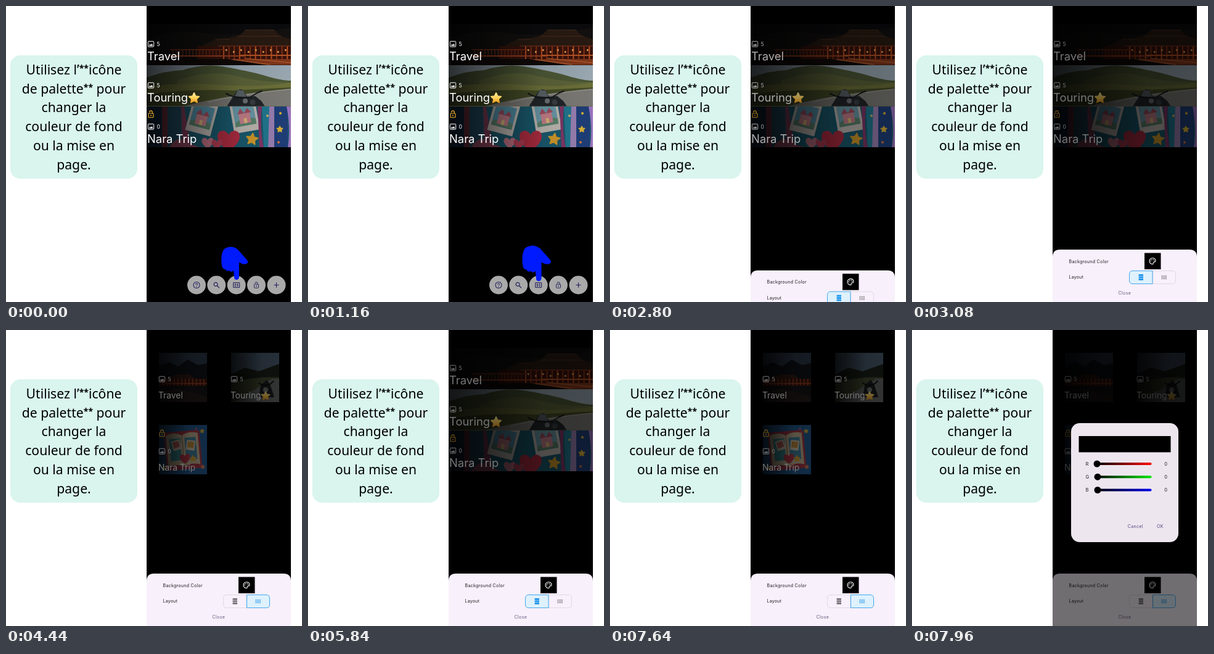
Recreate the animation shown at these times as an HTML page. Size 480 by 480 pixels, loop 8 s.

```html
<!DOCTYPE html>
<html lang="fr">
<head>
<meta charset="utf-8">
<title>Palette</title>
<style>
html, body { margin: 0; width: 100%; height: 100%; overflow: hidden; background: #fff; }
svg { display: block; }
text { font-family: Inter, Roboto, sans-serif; white-space: pre; }
.note { font-family: "Noto Sans", "Open Sans", sans-serif; font-size: 21.2px; text-anchor: middle; }
</style>
</head>
<body>
<svg id="stage" width="100%" height="100%" viewBox="0 0 480 480"></svg>
<script>
const LOOP = 8000;

const rect = (x, y, w, h, fill, more = '') =>
  `<rect x="${x}" y="${y}" width="${w}" height="${h}" fill="${fill}" ${more}/>`;
const path = (d, fill, more = '') => `<path d="${d}" fill="${fill}" ${more}/>`;
const line = (d, color, width = 1) =>
  path(d, 'none', `stroke="${color}" stroke-width="${width}" stroke-linecap="round" stroke-linejoin="round"`);
const circle = (x, y, r, fill, more = '') => `<circle cx="${x}" cy="${y}" r="${r}" fill="${fill}" ${more}/>`;
const text = (x, y, size, str, fill = '#fff', gap = 0) =>
  `<text x="${x}" y="${y}" font-size="${size}" fill="${fill}" letter-spacing="${gap}">${str}</text>`;
const at = (x, y, body, more = '') => `<g transform="translate(${x} ${y}) ${more}">${body}</g>`;
const repeat = (n, make) => Array.from({ length: n }, (_, i) => make(i)).join('');
const picture = (id, x, y, w, h, body) =>
  `<svg id="${id}" x="${x}" y="${y}" width="${w}" height="${h}" viewBox="0 0 ${w} ${h}">${body}</svg>`;
const ramp = (id, stops, dir = 'x2="1" y2="0"') =>
  `<linearGradient id="${id}" x1="0" y1="0" ${dir}>${stops.map(([o, c, a = 1]) =>
    `<stop offset="${o}" stop-color="${c}" stop-opacity="${a}"/>`).join('')}</linearGradient>`;

function star(x, y, r, fill, turn = 0) {
  const points = Array.from({ length: 10 }, (_, i) => {
    const a = (i * 36 - 90 + turn) * Math.PI / 180, d = i % 2 ? r * 0.5 : r;
    return (x + d * Math.cos(a)).toFixed(1) + ',' + (y + d * Math.sin(a)).toFixed(1);
  });
  return `<polygon points="${points.join(' ')}" fill="${fill}" stroke="${fill}" stroke-width="1.5" stroke-linejoin="round"/>`;
}
const heart = (x, y, s, fill) =>
  at(x, y, path('M0 10C-16 0 -11 -11 -4 -9Q-1 -8 0 -5Q1 -8 4 -9C11 -11 16 0 0 10Z', fill), `scale(${s})`);

// Icons, centred on 0,0
const imageIcon = (x, y) => at(x, y,
  '<rect x="-4.7" y="-4.4" width="9.4" height="8.8" rx="1" fill="none" stroke="#fff"/>' +
  path('M-3.4 2.7L-1.5 0L-.2 1.5L1.5 -.8L3.5 2.7Z', '#fff'));
const lockIcon = (x, y, color, s = 1) => at(x, y,
  `<rect x="-4" y="-1.5" width="8" height="6.8" rx="1" fill="none" stroke="${color}" stroke-width="1.1"/>` +
  line('M-2.3 -3.3A2.3 2.3 0 0 1 2.3 -3.3V-1.7', color, 1.1) + circle(0, 1.9, 1, color), `scale(${s})`);
const paletteIcon = at(390, 413.7,
  line('M0 -5A5 5 0 1 0 0 5Q1.6 5 1.1 3.3Q.8 1.6 2.5 1.6H3.5Q5 1.5 5 -.4Q4.6 -5 0 -5Z', '#fff', 1.1) +
  circle(-2.9, -.2, .8, '#fff') + circle(-1.5, -2.5, .8, '#fff') +
  circle(1.3, -2.5, .8, '#fff') + circle(2.9, -.5, .8, '#fff'));

// Wide pictures
const shrine = rect(0, 0, 234, 67, '#0c0c0e') +
  path('M0 24Q45 8 95 15T234 6V50H0Z', '#141211') +
  path('M92 34L112 25L134 23L150 19L160 10H207L216 19L234 25V36H92Z', '#2b1c13') +
  line('M160 10H207M148 20H218M112 25H134', '#4a3020') +
  rect(82, 36, 152, 24, '#3a140c') +
  repeat(15, i => rect(42 + i * 5.4, 41, 1.2, 13, '#82331c')) +
  repeat(13, i => rect(124 + i * 8.6, 36, 2, 24, i % 3 ? '#8f3518' : '#c65324')) +
  rect(38, 41, 90, 1.6, '#843319') + rect(116, 35, 118, 1.6, '#6f3019') +
  repeat(9, i => rect(128 + i * 12, 41 + i % 2 * 3, 2.6, 3, '#eda052')) +
  rect(38, 51, 120, 2, '#a54521') + rect(150, 50, 84, 2, '#c25a2a') +
  rect(0, 57, 234, 10, '#120b09') + path('M132 57H234V67H196Z', '#8a3a1c') +
  line('M140 58L200 66M160 56L234 63', '#c96d38') +
  rect(0, 0, 234, 67, 'url(#shade)');

const road = rect(0, 0, 234, 67, 'url(#sky)') +
  path('M0 20Q30 9 58 8Q92 -3 122 2Q165 9 192 17T234 25V50H0Z', '#525e3a') +
  path('M50 25Q100 6 142 17T234 28V48H50Z', '#636b3d') +
  path('M0 35Q60 27 120 32T234 28V67H0Z', '#74783d') +
  path('M0 47Q70 38 140 41L234 36V67H0Z', '#495129') +
  path('M58 67Q128 48 234 38V67Z', '#83827d') +
  line('M100 60Q150 47 233 39', '#b7b4aa', .8) +
  path('M130 67L137 56L144 45Q149 37 156 40L163 51L176 50L186 58L192 67Z', '#24282c') +
  path('M143 50L148 40L157 41L162 52Z', '#5e676c') +
  line('M135 49L147 53L168 52L179 45M179 45L187 42M135 49L129 46', '#15181b', 2) +
  circle(160, 58, 4, '#71787b') + circle(172, 60, 4.5, '#3d4246') +
  rect(0, 0, 234, 67, 'url(#shade)');

const polaroid = (x, y, turn, sky) => at(x, y,
  rect(-21, -26, 42, 50, '#c9c2bc') + rect(-17, -22, 34, 36, sky) +
  path('M-17 8Q-4 -2 17 5V14H-17Z', '#5f8a72') +
  rect(-9, -6, 18, 16, '#cf8590') + path('M-11 -6L-5 -15L0 -6L6 -14L12 -6Z', '#a94f63') +
  rect(-2, 2, 5, 8, '#e3c07f'), `rotate(${turn})`);
const album = rect(0, 0, 234, 67, '#1b5f74') +
  rect(0, 0, 27, 67, '#142b42') + rect(25, 0, 9, 67, '#6f3040') + rect(34, 0, 22, 67, '#234f66') +
  path('M56 0H61L72 67H58Z', '#87405e') +
  polaroid(89, 20, 15, '#5795ad') + polaroid(159, 17, -10, '#6fa2b2') +
  path('M180 0H187Q183 34 190 67H183Z', '#8a3a6d') + path('M187 0H200L197 67H190Z', '#237f99') +
  path('M199 0H208Q211 33 207 67H197Z', '#a388bd') + rect(207, 0, 22, 67, '#214380') +
  path('M227 0H234V67H229Q234 36 227 0Z', '#a67ccc') +
  path('M36 67Q48 47 61 55T90 67Z', '#964a61') +
  heart(99, 59, .9, '#c9788a') + heart(133, 55, 1.7, '#b82f45') + heart(114, 61, .8, '#b94058') +
  star(171, 53, 10, '#dda22d', 8) + star(216, 37, 5, '#eabe38') + star(217, 11, 1.6, '#eabe38') +
  circle(214, 58, 2, '#de7b48') + circle(196, 15, 2, '#d8bc70') +
  rect(0, 0, 234, 67, 'url(#shade)');

// Square pictures
const shrineTile = rect(0, 0, 78, 80, '#334153') +
  path('M0 22L16 15L31 22L47 11L63 20L78 17V56H0Z', '#11151b') +
  path('M12 42L28 35H49L59 42Z', '#3a2116') + rect(0, 42, 78, 12, '#41190f') +
  repeat(13, i => rect(i * 6, 42, 1.6, 11, '#a94526')) +
  rect(0, 49, 78, 1.5, '#b04c28') + rect(0, 55, 78, 25, '#1a171b') +
  path('M0 64L30 58L78 71V80H0Z', '#2a1f1e') + rect(0, 0, 78, 80, 'url(#shade)');
const roadTile = rect(0, 0, 78, 80, '#5b7188') +
  path('M0 35L22 24L45 30L78 18V60H0Z', '#20291f') +
  path('M0 50Q35 37 78 40V80H0Z', '#535b3b') + path('M6 80L66 42H78V80Z', '#777a78') +
  path('M45 72L48 52L58 44L64 53L70 72Z', '#202326') +
  line('M45 49L52 53L63 51L69 46', '#111', 2) + circle(56, 60, 4, '#888') +
  rect(0, 0, 78, 80, 'url(#shade)');
const albumTile = rect(0, 0, 78, 80, '#2a68a5') +
  at(39, 40, rect(-29, -30, 58, 62, '#bc3f52', 'rx="4"') +
    path('M-26 -25Q-10 -30 0 -23Q12 -30 26 -25V26Q12 21 0 28Q-11 21 -26 26Z', '#e3cfaa') +
    rect(-21, -19, 18, 36, '#43a3a9') + rect(4, -19, 18, 36, '#4b94b6') +
    line('M0 -23V28', '#a66d58') +
    at(-10, -8, rect(-7, -8, 14, 16, '#f0e2ca') + rect(-5, -6, 10, 10, '#d76e6c'), 'rotate(-12)') +
    at(13, -6, rect(-7, -8, 14, 16, '#f0e2ca') + rect(-5, -6, 10, 10, '#d9a046'), 'rotate(12)') +
    heart(2, 15, .8, '#d54257') + star(15, 16, 5, '#edb93e'), 'rotate(-5)') +
  star(70, 10, 3, '#edc344') + star(9, 70, 3, '#edc344') + star(71, 68, 3, '#ed8b64') +
  circle(60, 6, 1.5, '#e46d87') + rect(0, 0, 78, 80, 'url(#shade)');

const item = (x, y, size, name, count, gap) =>
  imageIcon(x + 6, y - 20 + gap) + text(x + 15.5, y - 16.9 + gap, 8.5, count) + text(x, y, size, name);
const list =
  picture('listA', 228, 29, 234, 66.5, shrine) + picture('listB', 228, 96, 234, 66.5, road) +
  picture('listC', 228, 163, 234, 66, album) +
  item(229, 88, 18.4, 'Travel', 5, -6.3) + item(229, 155, 18.4, 'Touring', 5, -6.3) +
  item(229, 222, 18.4, 'Nara Trip', 0, -6.3) +
  star(305, 149.5, 8.8, 'url(#gold)') + lockIcon(235, 175.5, '#f2b02d');
const grid =
  picture('gridA', 248, 37, 78, 80, shrineTile) + picture('gridB', 365, 37, 78, 80, roadTile) +
  picture('gridC', 248, 154, 78, 80, albumTile) +
  item(247, 111, 13.8, 'Travel', 5, -11.3) + item(364, 111, 13.8, 'Touring', 5, -11.3) +
  item(247, 228, 13.8, 'Nara Trip', 0, -11.3) +
  star(421, 107, 7, 'url(#gold)') + lockIcon(253, 167.5, '#f2b02d');

const ink = '#24215c';
const buttons = [309, 341.3, 373.7, 406, 438.5].map(x => circle(x, 452.5, 15, '#a9a9a9')).join('') +
  at(309, 452.5, `<circle r="5" fill="none" stroke="${ink}" stroke-width="1.1"/>` +
    line('M-1.6 -1.3Q-1.5 -2.8 0 -2.8T1.6 -1.3Q1.5 -.4 0 .8', ink) + circle(0, 2.7, .7, ink)) +
  at(341.3, 452.5, `<circle cx="-1.2" cy="-1.2" r="3" fill="none" stroke="${ink}" stroke-width="1.2"/>` +
    line('M1.2 1.2L4.4 4.4', ink, 1.3)) +
  at(373.7, 452.5, `<rect x="-5" y="-4" width="10" height="8" rx="1" fill="none" stroke="${ink}" stroke-width="1.1"/>` +
    repeat(4, i => rect(i % 2 ? .7 : -2.9, i < 2 ? -2.2 : .5, 2.2, 1.7, ink))) +
  lockIcon(406, 452.5, ink, .88) + at(438.5, 452.5, line('M-3.6 0H3.6M0 -3.6V3.6', ink, 1.2));

const hand = path('M358 392Q367 388 376 395L391 412Q394 416 390 418Q385 420 379 416L378 416V440' +
  'Q377 444 374 444Q370 444 370 440L369 429Q365 433 362 429Q357 431 356 427Q351 427 350 421Q348 408 351 399Q353 393 358 392Z', '#001aff');

const leftHalf = 'M390 429.5H358Q352.5 429.5 352.5 435V445Q352.5 450.5 358 450.5H390Z';
const rightHalf = 'M390.5 429.5H422Q427.5 429.5 427.5 435V445Q427.5 450.5 422 450.5H390.5Z';
const sheet = path('M228 480V407Q228 395 240 395H450Q462 395 462 407V480Z', '#f8f0fa') +
  text(254.5, 416.5, 7, 'Background Color', '#1d1b20', .3) + text(254.5, 442.4, 7, 'Layout', '#1d1b20', .2) +
  text(334.5, 468, 7, 'Close', '#65577f', .4) +
  rect(377, 400.5, 26.5, 26.5, '#000') + paletteIcon +
  `<path id="left" d="${leftHalf}"/><path id="right" d="${rightHalf}"/>` +
  `<g id="bars">${repeat(3, i => rect(367.6, 435 + i * 3.5, 7.4, 2.8, 'currentColor'))}</g>` +
  `<g id="dots">${repeat(12, i => rect(404.6 + i % 4 * 2.3, 437 + (i >> 2) * 2.3, 1.4, 1.4, 'currentColor'))}</g>`;

const slider = (name, y, x, id) => text(281.5, y + 2.8, 7.5, name, '#1d1b20') +
  rect(298, y - 2, 90.5, 4, `url(#${id})`, 'rx="2"') + circle(x, y, 5.5, '#000') +
  text(409.3, y + 2.8, 7.5, '0', '#1d1b20');
const dialog = rect(258, 151, 174, 193, '#ede6ef', 'rx="14"') + rect(270.5, 172, 149, 26.3, '#000') +
  slider('R', 217, 300, 'red') + slider('G', 238.2, 301, 'green') + slider('B', 259.5, 301, 'blue') +
  text(349.8, 320.8, 7, 'Cancel', '#54447f', .3) + text(397, 320.8, 7, 'OK', '#54447f', .3);

const stars = '<tspan font-size="14" font-weight="600" dy="-4.5">**</tspan>';
const lines = [`Utilisez l’${stars}<tspan dy="4.5">icône</tspan>`, `de palette${stars}<tspan dy="4.5"> pour</tspan>`,
  'changer la', 'couleur de fond', 'ou la mise en', 'page.'];

const stage = document.getElementById('stage');
stage.innerHTML = '<defs>' +
  ramp('shade', [[0, '#000', .75], [.3, '#000', .5], [.65, '#000', .15], [1, '#000', .08]]) +
  ramp('sky', [[0, '#a3b4c0'], [1, '#aeb9bd']], 'x2="0" y2="1"') +
  ramp('gold', [[0, '#ffe9a0'], [.5, '#ffd25a'], [1, '#ee9b22']], 'x2="0" y2="1"') +
  ramp('red', [[0, '#000'], [1, '#f00']]) + ramp('green', [[0, '#000'], [1, '#00e800']]) +
  ramp('blue', [[0, '#000'], [1, '#00e']]) +
  '<clipPath id="screen"><rect x="228" width="234" height="480"/></clipPath></defs>' +
  rect(7, 80, 206, 200, '#d9f5ed', 'rx="16"') +
  lines.map((s, i) => `<text class="note" x="110" y="${110.8 + i * 30.75}" fill="#000">${s}</text>`).join('') +
  `<g clip-path="url(#screen)">${rect(228, 0, 234, 480, '#000')}
  <g id="list">${list}</g><g id="grid">${grid}</g><g id="buttons">${buttons}</g>
  ${rect(228, 0, 234, 480, '#000', 'id="dim"')}<g id="sheet">${sheet}</g>
  <g id="hand">${hand}</g>
  <g id="modal">${rect(228, 0, 234, 480, '#000', 'opacity=".54"')}${dialog}</g></g>`;

const part = {};
stage.querySelectorAll('[id]').forEach(n => part[n.id] = n);
const set = (id, attrs) => { for (const k in attrs) part[id].setAttribute(k, attrs[k]); };
const show = (id, on) => set(id, { display: on ? 'inline' : 'none' });
const span = (t, a, b) => Math.min(1, Math.max(0, (t - a) / (b - a)));
const slow = p => 1 - (1 - p) ** 3;

function draw(t) {
  // Tap hint swells once, then fades
  const size = 1 + 0.1 * (1 - Math.cos(2 * Math.PI * span(t, 520, 1340)));
  set('hand', { transform: `translate(370.5 417.5) scale(${size}) translate(-370.5 -417.5)`,
    opacity: 1 - span(t, 1340, 1460) });

  const rise = slow(span(t, 2700, 3080));
  set('sheet', { transform: `translate(0 ${85 * (1 - rise)})` });
  show('sheet', rise > 0);
  set('dim', { opacity: 0.54 * rise });

  const tiled = t >= 4120 && t < 5840 || t >= 6760;
  show('list', !tiled);
  show('grid', tiled);
  // The middle picture loads a moment after each layout change
  show('listB', t < 4120 || t >= 5920);
  show('gridB', t < 6760 ? t >= 4200 : t >= 6840);
  const half = (id, on) => set(id, { fill: on ? '#def1fd' : 'none', stroke: on ? '#43a8ee' : '#e0d9e2' });
  half('left', !tiled);
  half('right', tiled);
  part.right.parentNode.insertBefore(tiled ? part.right : part.left, part.bars);
  set('bars', { color: tiled ? '#777379' : '#1e95ec' });
  set('dots', { color: tiled ? '#1e95ec' : '#777379' });

  const open = slow(span(t, 7690, 7940));
  set('modal', { opacity: open });
  show('modal', open > 0);
}

const start = performance.now();
function tick(now) {
  draw(Math.max(0, now - start) % LOOP);
  requestAnimationFrame(tick);
}
draw(0);
requestAnimationFrame(tick);
</script>
</body>
</html>
```
